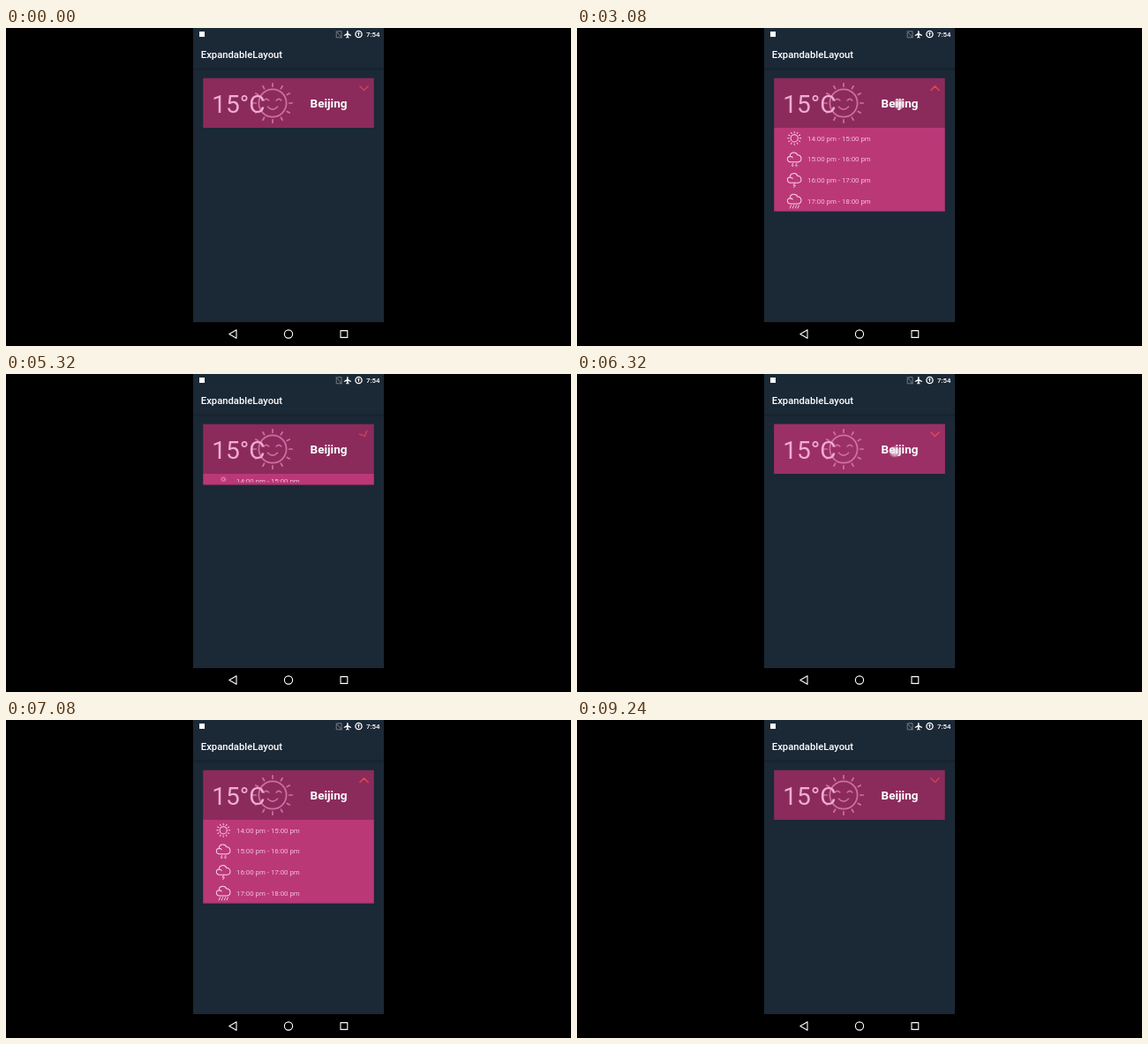
Recreate the animation shown at these times as an HTML page. Size 640x360 px, loop 9320 ms.

```html
<!DOCTYPE html>
<html lang="en">
<head>
<meta charset="utf-8">
<title>ExpandableLayout</title>
<style>
  html, body { margin: 0; width: 100%; height: 100%; overflow: hidden; background: #000; }
  #stage { display: block; width: 640px; height: 360px; font-family: Roboto, "Open Sans", sans-serif; }
  .line { fill: none; stroke-linecap: round; stroke-linejoin: round; }
  .row text { font-size: 7.875px; fill: #f3bfd9; }
  .row .line { stroke: #f6d3e4; stroke-width: 1; }
</style>
</head>
<body>
<svg id="stage" viewBox="0 0 640 360">
  <defs>
    <linearGradient id="shade" x2="0" y2="1">
      <stop stop-color="#000" stop-opacity=".22"/>
      <stop offset="1" stop-color="#000" stop-opacity="0"/>
    </linearGradient>
    <radialGradient id="glow">
      <stop stop-color="#fff" stop-opacity=".8"/>
      <stop offset=".65" stop-color="#eadce6" stop-opacity=".62"/>
      <stop offset="1" stop-color="#d8c4d2" stop-opacity=".1"/>
    </radialGradient>
    <path id="cloud" d="M-4.3 3.2C-8.7 3.2 -9 -2.6 -5 -3C-5 -8.2 2 -9 3.6 -4.6C8.8 -5 9.2 3.2 4.3 3.2ZM-4.6 -2.8Q-2.8 -3 -2 -1.6"/>
  </defs>

  <rect width="640" height="360"/>
  <rect x="212" width="216" height="333" fill="#1b2836"/>
  <rect x="212" y="45.5" width="216" height="3.5" fill="url(#shade)"/>

  <!-- status bar -->
  <rect x="219" y="4" width="6" height="6" fill="#fff"/>
  <g class="line" stroke="#7c858e" stroke-width=".9">
    <path d="M376 3.7H380V10.8H374.2V5.5ZM374 3.5L380.3 11"/>
  </g>
  <path d="M386.1 3.8Q386.9 2.4 387.6 3.8V5.9L391 8V9L387.6 8V10L388.7 10.8V11.4L386.9 10.9L385 11.4V10.8L386.1 10V8L382.8 9V8L386.1 5.9Z" fill="#fff"/>
  <g class="line" stroke="#fff" stroke-width="1.3">
    <circle cx="399.5" cy="7" r="3.6"/>
    <path d="M398.3 6.3L399.5 5.1L400.7 6.3M399.5 5.4V8.5" stroke-width="1"/>
  </g>
  <text x="408" y="9.9" font-size="7.875" font-weight="500" fill="#fff">7:54</text>
  <text x="220.8" y="34" font-size="11.25" font-weight="500" fill="#fff">ExpandableLayout</text>

  <!-- card -->
  <rect id="body" x="223.25" y="113" width="193.5" fill="#bb3877"/>
  <rect id="edge" x="223.25" width="193.5" height="1" fill="#a72f6a" opacity=".6"/>
  <g id="rows"></g>
  <rect x="223.25" y="56.8" width="193.5" height="56.2" fill="#8b2b5b"/>
  <rect id="press" x="223.25" y="56.8" width="193.5" height="56.2" fill="#9b3066"/>
  <g class="line" transform="translate(302 85)" stroke="#cf6ea2" stroke-width="1.8">
    <circle r="15.6"/>
    <path id="rays" stroke-width="1.7"/>
    <path d="M-9.8 -3Q-7 -6.2 -4.2 -3M4.2 -3Q7 -6.2 9.8 -3M-5.5 4.2Q0 10 5.5 4.2" stroke-width="1.6"/>
  </g>
  <text x="233.2" y="96" font-size="28.1" fill="#f0acd3">15°C</text>
  <text x="344.6" y="90.2" font-size="13.5" font-weight="700" fill="#fff">Beijing</text>
  <path id="arrow" class="line" d="M-4.6 -2.3L0 2.3L4.6 -2.3" stroke="#dc4850" stroke-width="1.5"/>
  <circle id="dot" r="6.8" fill="url(#glow)"/>

  <!-- navigation bar -->
  <g class="line" stroke="#fff" stroke-width="1.1">
    <path d="M252.8 346.5L261 341.7V351.3Z"/>
    <circle cx="320" cy="346.5" r="4.6"/>
    <rect x="379" y="342.6" width="7.8" height="7.8"/>
  </g>
</svg>
<script>
const LOOP = 9320, STEP = 40, TURN = 360;
const TOP = 113, ROW = 23.63, PAD = 2.8, LINE = 10.4, FULL = ROW * 4;

// [start, open?]
const toggles = [[2500, 1], [5045, 0], [6574, 1], [8804, 0]];
// [down, up, x, y]
const touches = [[2360, 2480, 355, 91], [3080, 4960, 365, 86], [6280, 6540, 360, 88], [8600, 8800, 362, 186]];
// [on, off]
const presses = [[2360, 2500], [4840, 5000], [6320, 6540]];

const $ = id => document.getElementById(id);
const clamp = v => Math.max(0, Math.min(1, v));
const ease = v => (1 - Math.cos(Math.PI * clamp(v))) / 2;
const set = (el, attrs) => { for (const k in attrs) el.setAttribute(k, attrs[k]); };

function rayPath(inner, outer) {
  let d = "";
  for (let i = 0; i < 12; i++) {
    const a = i * Math.PI / 6, c = Math.cos(a), s = Math.sin(a);
    d += `M${c * inner} ${s * inner}L${c * outer} ${s * outer}`;
  }
  return d;
}
set($("rays"), { d: rayPath(18.8, 22.2) });

const cloud = extra => `<use href="#cloud"/><path d="${extra}" stroke-width=".9"/>`;
const icons = [
  `<circle r="4.1"/><path d="${rayPath(6.1, 7.5)}"/>`,
  cloud("M-1.6 4.8C-4.6 8.6 -.4 9.4 -1.2 6.7M2.6 4.8C-.4 8.6 3.8 9.4 3 6.7"),
  cloud("M.6 3.6L-1.2 6H1.2L-.6 8.5"),
  cloud("M-3.6 5L-5 8.3M-.6 5L-2 8.3M2.4 5L1 8.3M5.2 5L3.8 8.3")
];
$("rows").innerHTML = icons.map((icon, i) =>
  `<svg class="row" x="223" width="193" overflow="hidden"><g class="line">${icon}</g>` +
  `<text x="38">${14 + i}:00 pm - ${15 + i}:00 pm</text></svg>`).join("");
const rows = [...$("rows").children];

function openness(t) {
  let p = 0;
  for (const [start, open] of toggles) {
    if (t >= start) {
      const e = ease((t - start) / TURN);
      p = open ? e : 1 - e;
    }
  }
  return p;
}

const held = (t, on, off, fade) => t < on ? 0 : clamp(1 - (t - off) / fade);

// The last visible row is squeezed: its icon shrinks and its text is cut off.
function layRow(row, i, height) {
  const h = Math.min(ROW, height - i * ROW) - 2 * PAD;
  row.style.display = h > 0.4 ? "" : "none";
  if (h <= 0.4) return;
  set(row, { y: TOP + i * ROW + PAD, height: h });
  set(row.firstChild, { transform: `translate(23.2 ${h / 2}) scale(${h / 18})` });
  set(row.lastChild, { y: (h - Math.min(LINE, h)) / 2 + 8.1 });
}

function draw(t) {
  const p = openness(t), height = p * FULL;
  const press = Math.max(...presses.map(([on, off]) => held(t, on, off, 160)));
  set($("body"), { height });
  set($("edge"), { y: TOP + height - 1, visibility: height > 1 ? "visible" : "hidden" });
  rows.forEach((row, i) => layRow(row, i, height));
  set($("press"), { opacity: press });
  set($("arrow"), {
    transform: `translate(405.5 68.2) rotate(${-180 * p})`,
    opacity: 0.72 + 0.28 * Math.max(p, press)
  });
  let alpha = 0;
  for (const [down, up, x, y] of touches) {
    const a = held(t, down, up, 90);
    if (a > 0) {
      alpha = a;
      set($("dot"), { cx: x, cy: y });
    }
  }
  set($("dot"), { opacity: alpha });
}

const began = performance.now();
function tick() {
  const t = (performance.now() - began) % LOOP;
  draw(Math.floor(t / STEP) * STEP);
  requestAnimationFrame(tick);
}
tick();
</script>
</body>
</html>
```
